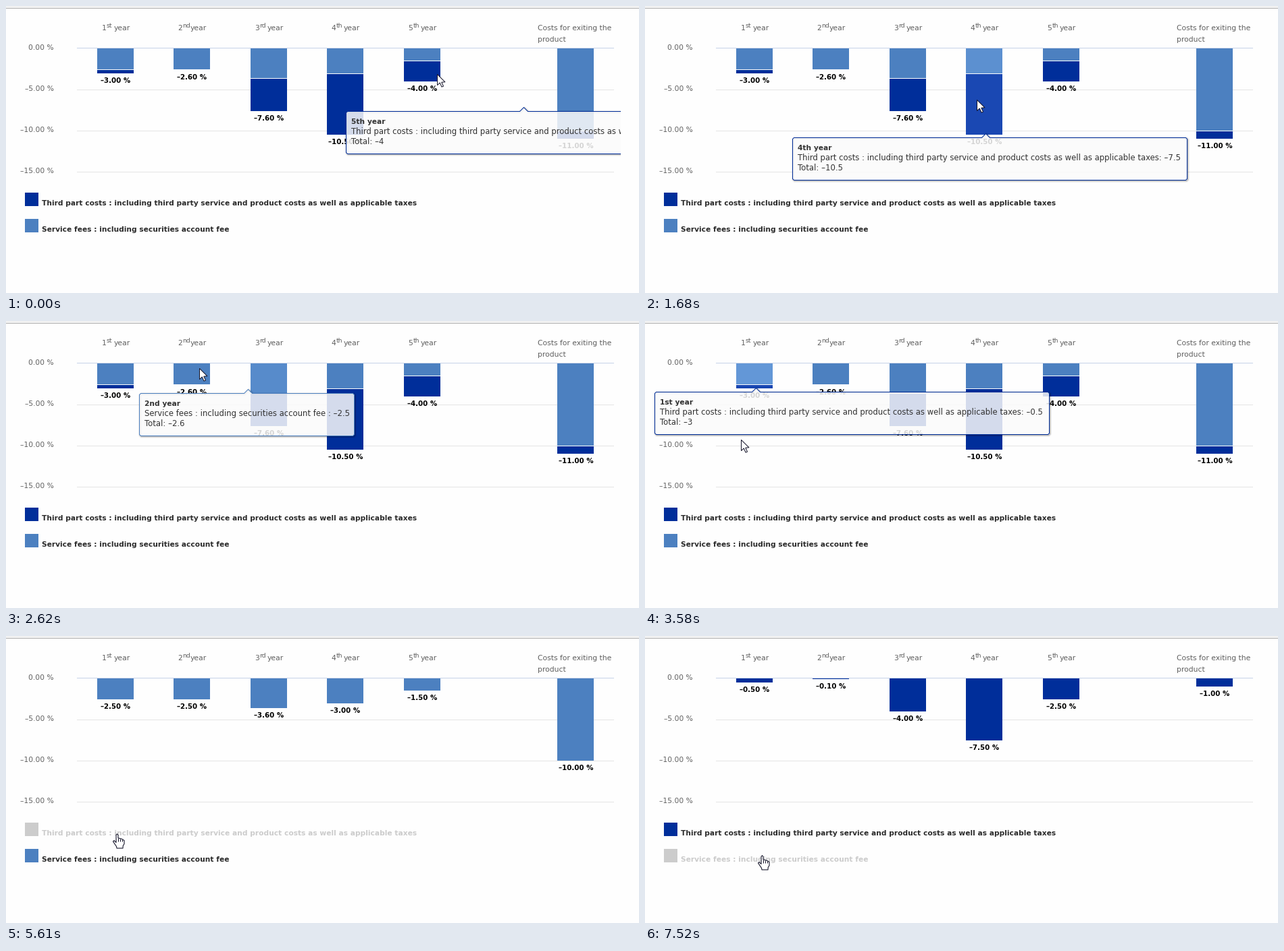
A matplotlib script for the animation above (8 s loop, 937x426 px).

```python
import numpy as np
import matplotlib.pyplot as plt
from matplotlib.animation import FuncAnimation
from matplotlib.patches import Polygon, Rectangle

W, H, DPI = 937, 426, 64
LOOP, TICK, DT = 8000, 40, 5
PT = 72 / DPI
plt.rcParams["font.family"] = "DejaVu Sans"

SERVICE, THIRD = 0, 1
COLORS = np.array([(76, 128, 192), (0, 46, 154)]) / 255
VALUES = np.array([[2.5, 2.5, 3.6, 3, 1.5, 10],
                   [0.5, 0.1, 4, 7.5, 2.5, 1]])
NAMES = ["Service fees : including securities account fee",
         "Third part costs : including third party service and product costs"
         " as well as applicable taxes"]
YEARS = ["1st", "2nd", "3rd", "4th", "5th"]
LEFTS = [135 + 227 * k // 2 for k in (0, 1, 2, 3, 4, 6)]
BAR_W, ZERO, UNIT = 54, 63, 12.2
LEGEND_Y = [316, 277]
TIP_W, TIP_H = [319, 585], 64
TIP_START = (503, 156, 766)
CLIP_X = 910

# The screen refreshes at a steady beat in bursts, with pauses between them.
BEAT = 136
BURSTS = [(0, 4520), (5080, 5610), (6010, 6820), (7090, 7520)]
STEPS = np.concatenate([np.linspace(a, b, round((b - a) / BEAT) + 1) for a, b in BURSTS])

# Pointer path: time, x, y. Hovering and the tooltip follow from it.
MOUSE = np.array([
    (0, 638, 101), (355, 632, 94), (685, 611, 73), (1385, 520, 97), (1644, 491, 139),
    (2165, 385, 115), (2525, 325, 80), (2602, 286, 70), (3427, 160, 93),
    (3561, 142, 176), (4370, 158, 288), (4520, 164, 293), (6415, 164, 293),
    (6820, 173, 325)])
# Legend clicks: time, visible series
CLICKS = [(0, (1, 1)), (5080, (1, 0)), (6010, (1, 1)), (7090, (0, 1))]
CLICK_MOVE = 430

ARROW = [(0, 0), (0, 16), (3.8, 12.5), (6.5, 18.6), (9, 17.5), (6.3, 11.7), (11.4, 11.3)]
HAND = [(5, 2), (6.5, 0.3), (8, 2), (8, 6.3), (13.5, 7.8), (17, 10), (17, 15), (15.2, 18),
        (15, 21.5), (6, 21.5), (5.5, 19), (0.5, 11.5), (2, 10), (5, 13)]
INK = "#15152a"

fig = plt.figure(figsize=(W / DPI, H / DPI), dpi=DPI, facecolor="#fefefe")
ax = fig.add_axes([0, 0, 1, 1])
ax.set_xlim(0, W)
ax.set_ylim(H, 0)
ax.axis("off")
moving = []


def box(x0, y0, x1, y1, color, z=1):
    return ax.add_patch(Rectangle((x0, y0), x1 - x0, y1 - y0, fc=color, lw=0,
                                  antialiased=False, zorder=z))


def shape(points, z, fc="none", ec="none", lw=1.0, alpha=None, closed=True):
    return ax.add_patch(Polygon(points, closed=closed, fc=fc, ec=ec, lw=lw * PT, alpha=alpha,
                                joinstyle="round", zorder=z))


def text(x, y, s, size, color, ha="left", bold=False, z=3, alpha=1):
    return ax.text(x, y, s, size=size * PT, color=color, ha=ha, va="baseline", zorder=z,
                   weight="bold" if bold else "normal", alpha=alpha)


def number(v):
    return f"\u2013{v:g}"


def percent(v):
    return f"\u2013{v:.2f} %"


def swing(p):
    return 0.5 - np.cos(np.pi * np.clip(p, 0, 1)) / 2


def level(v):
    return int(np.floor(ZERO + UNIT * v + 0.5))


def center(col):
    return LEFTS[col] + BAR_W / 2


def mouse_at(t):
    return [np.interp(t, MOUSE[:, 0], MOUSE[:, k]) for k in (1, 2)]


def bar_at(x, y):
    """Column and series under the pointer, or None."""
    v = (y - ZERO) / UNIT
    for col, left in enumerate(LEFTS):
        if left <= x < left + BAR_W and 0 <= v < VALUES[:, col].sum():
            return col, int(v >= VALUES[SERVICE, col])
    return None


def simulate(lag=100, fade=350, patience=800, fade_out=250):
    """Tooltip position, its bar, its opacity and the glow of every bar over one loop."""
    keep = np.array([2 / 3, 1 / 2, 2 / 3]) ** (DT / 32)
    pos, bar, idle = np.array(TIP_START, float), (4, THIRD), 0
    glow, past, track = np.zeros(VALUES.shape), [None] * (lag // DT), []
    for t in range(0, LOOP, DT):
        track.append((np.round(pos), bar, np.clip(1 - (idle - patience) / fade_out, 0, 1),
                      glow.copy()))
        hit = bar_at(*mouse_at(t))
        past.append(hit)
        bar, idle = (hit, 0) if hit else (bar, idle + DT)
        glow = np.maximum(glow - DT / fade, 0)
        lit = past.pop(0)
        if lit:
            glow[lit[::-1]] = 1
        col, s = bar
        goal = np.array([max(12, center(col) - TIP_W[s] / 2),
                         level(VALUES[:s + 1, col].sum()) + 5, center(col)])
        pos = goal + (pos - goal) * keep
    return track


def draw_static():
    box(0, 0, W, 3, "#f1f1f1")
    box(0, 3, W, 4, "#b2b2b2")
    for k in range(4):
        y = level(5 * k) - (k == 0)
        box(105, y, 900, y + 1, "#e4e4e4" if k else "#c6d2e8")
        text(71, 65 + 61 * k, percent(5 * k) if k else "0.00 %", 10.7, "#606060", "right")
    for name, x in zip(YEARS, LEFTS):
        text(x + 6.5, 36, name[0], 10.75, "#606060")
        text(x + 13.5, 32, name[1:], 9.2, "#606060")
        text(x + 48.5, 36, "year", 10.75, "#606060", "right")
    text(787, 36, "Costs for exiting the", 10.75, "#606060")
    text(787, 53, "product", 10.75, "#606060")


def chart_state(t):
    k = max(i for i, c in enumerate(CLICKS) if c[0] <= t)
    start, shown = CLICKS[k]
    before = CLICKS[max(k - 1, 0)][1]
    return np.array(before), np.array(shown), swing((t - start) / CLICK_MOVE)


def draw_chart(t, glow):
    before, shown, p = chart_state(t)
    base = 1 if shown[SERVICE] else 1 - p
    out = []
    for col, x in enumerate(LEFTS):
        fees, costs = VALUES[:, col]
        spans = [(0, fees), (base * fees, base * fees + costs)]
        for s, (lo, hi) in enumerate(spans):
            if not shown[s]:
                continue
            top, bottom = level(lo), level(hi)
            if top > ZERO:
                out.append(box(x, top, x + BAR_W, top + 1, "white", 2))
                top += 1
            if bottom > top:
                color = np.clip(COLORS[s] + 0.1 * glow[s, col], 0, 1)
                out.append(box(x, top, x + BAR_W, bottom, color, 2))
        old, new = before @ VALUES[:, col], shown @ VALUES[:, col]
        y = level(old + (new - old) * p) + 14
        out.append(text(center(col) + 0.5, y, percent(new), 10.2, "black", "center", True))
    for s, y in enumerate(LEGEND_Y):
        on = shown[s]
        out.append(box(28, y, 48, y + 20, COLORS[s] if on else "#cccccc"))
        out.append(text(53, y + 19, NAMES[s], 10.58, "#2b2b2b" if on else "#cccccc", bold=True))
    return out


def draw_tip(pos, bar, alpha):
    if alpha <= 0:
        return []
    (x, y, anchor), (col, s) = pos, bar
    x0, y0, x1, y1 = x + 0.5, y + 0.5, x + TIP_W[s] - 0.5, y + TIP_H - 0.5
    a, r = anchor + 0.5, 2
    notch = [(a - 6, y0), (a, y0 - 6), (a + 6, y0)] if x0 + 9 < a < x1 - 9 else []
    edge = np.array([(x0 + r, y0), *notch, (x1 - r, y0), (x1, y0 + r), (x1, y1 - r),
                     (x1 - r, y1), (x0 + r, y1), (x0, y1 - r), (x0, y0 + r)])
    out = [shape(edge + 1, 5, ec="black", lw=7 - 2 * k, alpha=0.05 * k * alpha)
           for k in (1, 2, 3)]
    out.append(shape(edge, 6, fc="#fbfbfb", alpha=0.85 * alpha))
    out.append(shape(edge, 7, ec=COLORS[s], alpha=alpha))
    gap = ": " if s == THIRD else " : "
    rows = [YEARS[col] + " year", NAMES[s] + gap + number(VALUES[s, col]),
            "Total: " + number(VALUES[:, col].sum())]
    for k, row in enumerate(rows):
        out.append(text(x + 8, y + 19 + 15 * k, row, 11.6 if k else 10.63, "#333333",
                        bold=k == 0, z=8, alpha=alpha))
    for item in out:
        item.set_clip_on(True)
        item.set_clip_path(Rectangle((0, 0), CLIP_X, H, transform=ax.transData))
    return out


def draw_mouse(t):
    x, y = np.round(mouse_at(t))
    if not any(top <= y < top + 20 for top in LEGEND_Y):
        return [shape(np.array([x + 0.5, y + 0.5]) + ARROW, 10, fc="white", ec=INK)]
    spot = np.array([x - 6, y + 0.5])
    out = [shape(spot + HAND, 10, fc="white", ec=INK, lw=1.1)]
    for k in range(3):
        knuckle = [(8 + 3 * k, 6.5 + k), (8 + 3 * k, 11.5)]
        out.append(shape(spot + knuckle, 11, ec=INK, closed=False))
    return out


def update(i):
    now = i * TICK + TICK / 2
    t = STEPS[np.searchsorted(STEPS, now, side="right") - 1]
    pos, bar, alpha, glow = TRACK[int(t // DT)]
    for item in moving:
        item.remove()
    moving[:] = draw_chart(t, glow) + draw_tip(pos, bar, alpha) + draw_mouse(t)
    return moving


TRACK = simulate()
draw_static()
anim = FuncAnimation(fig, update, frames=LOOP // TICK, interval=TICK, repeat=True,
                     repeat_delay=0, init_func=lambda: moving, blit=False)
plt.show()
```
